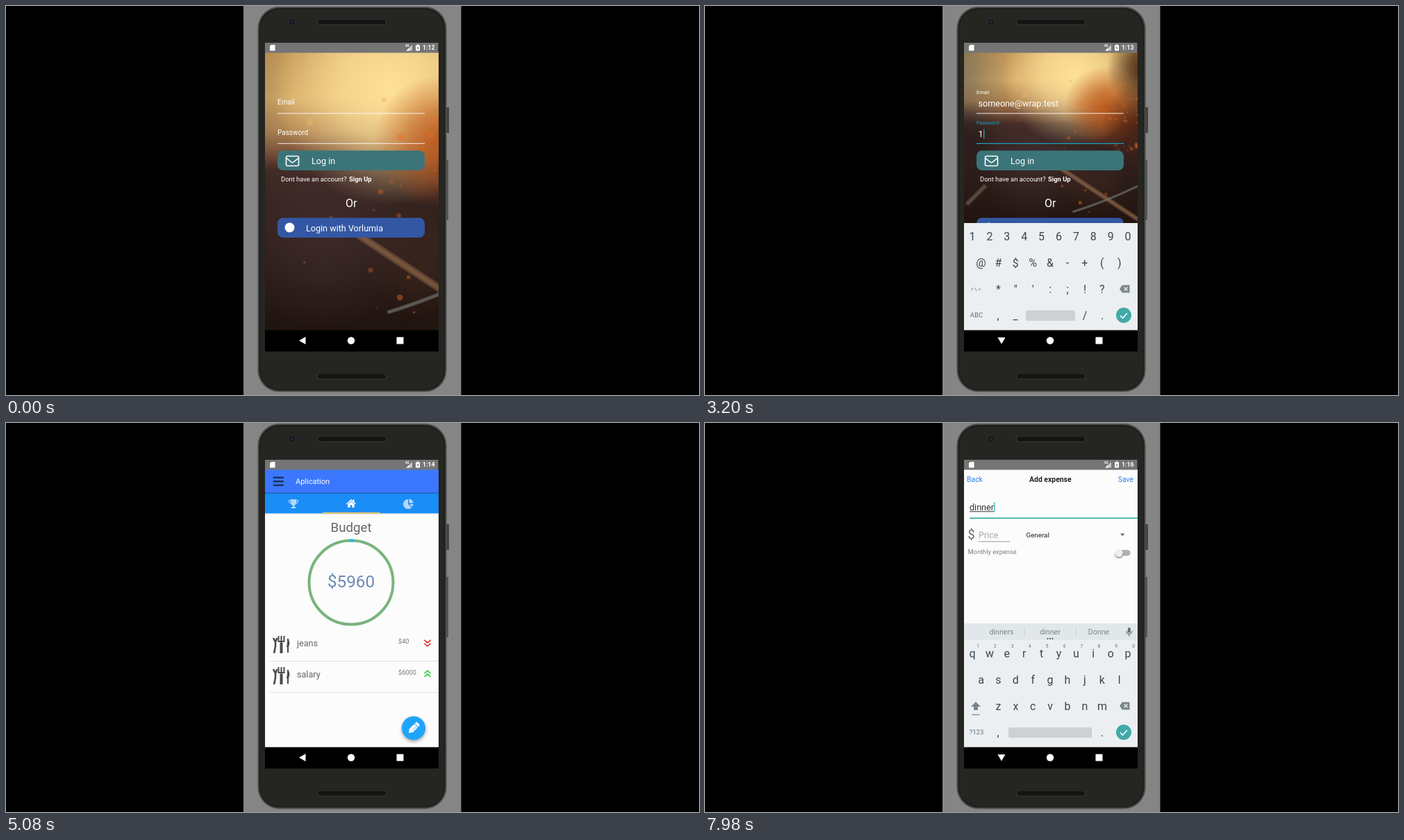
An HTML page with a canvas for the animation above (8000 ms loop, 998x561 px).

```html
<!DOCTYPE html>
<html lang="en">
<head>
<meta charset="utf-8">
<title>Budget app</title>
<style>
  html, body { margin: 0; width: 100%; height: 100%; overflow: hidden; background: #000; }
  canvas { display: block; }
</style>
</head>
<body>
<canvas id="stage" width="998" height="561"></canvas>
<script>
const ctx = document.getElementById('stage').getContext('2d');
const LOOP = 8000;
const EMAIL = 'someone@wrap.test', PASSWORD = '123456', TITLE = 'dinner';
const LETTERS = ['qwertyuiop', 'asdfghjkl', 'zxcvbnm'];
const SYMBOLS = ['1234567890', '@#$%&-+()', '*"\':;!?'];
const ROWS = [[385, 332], [397.5, 370], [422.5, 408]];
const KEY_STEP = 24.9;

// Moments of the story, in ms
const EMAIL_FOCUS = 600, EMAIL_TYPE = 820, PASS_FOCUS = 2620, PASS_SYMBOLS = 2900,
  PASS_TYPE = 3040, SUBMIT = 3850, HOME = 4100, MENU = 5200, FADE = 6560, FORM = 6760,
  FORM_KEYS = 7060, TITLE_TYPE = 7250;

const clamp = x => Math.max(0, Math.min(1, x));
const ease = (t, start, length) => 1 - (1 - clamp((t - start) / length)) ** 3;
const mix = (a, b, k) => a + (b - a) * k;
const count = (s, t, start, step) => Math.max(0, Math.min(s.length, Math.floor((t - start) / step)));
const caretOn = t => t % 1060 < 600;

function text(s, x, y, size, color, align = 'left', weight = 400) {
  ctx.font = `${weight} ${size}px Roboto, sans-serif`;
  ctx.textAlign = align;
  ctx.fillStyle = color;
  ctx.fillText(s, x, y + size * 0.36);
  return ctx.measureText(s).width;
}
function rect(x, y, w, h, color, r = 0) {
  ctx.fillStyle = color;
  ctx.beginPath();
  ctx.roundRect(x, y, w, h, r);
  ctx.fill();
}
function disc(x, y, r, color) {
  ctx.fillStyle = color;
  ctx.beginPath();
  ctx.arc(x, y, r, 0, 7);
  ctx.fill();
}
function shape(path, color) {
  ctx.fillStyle = color;
  ctx.fill(new Path2D(path));
}
function line(path, color, width = 1) {
  ctx.strokeStyle = color;
  ctx.lineWidth = width;
  ctx.stroke(new Path2D(path));
}
function at(x, y, angle, draw) {
  ctx.save();
  ctx.translate(x, y);
  ctx.rotate(angle);
  draw();
  ctx.restore();
}
function shadowed(draw, blur = 5) {
  ctx.save();
  ctx.shadowColor = 'rgba(0,0,0,.4)';
  ctx.shadowBlur = blur;
  ctx.shadowOffsetY = 2;
  draw();
  ctx.restore();
}
function gradient(g, stops) {
  stops.forEach(([p, c]) => g.addColorStop(p, c));
  return g;
}

function phone() {
  rect(0, 0, 998, 561, '#000');
  rect(342, 0, 313.5, 561, '#858585');
  rect(634, 146, 4, 37, '#444');
  rect(634, 222, 3, 87, '#555');
  rect(362.5, 1, 272, 555.5, '#4b4b49', 31);
  rect(364.5, 3, 268, 551.5, '#1b1b1a', 29);
  rect(366, 5, 265, 548, '#252522', 28);
  for (const y of [19, 530]) {
    rect(448, y, 100, 8.5, '#383836', 4);
    rect(449, y + 0.5, 98, 7, '#141414', 3.5);
  }
  disc(412, 23, 3.5, '#15161f');
  disc(412, 23, 1.5, '#29304a');
}

function statusBar(t) {
  rect(373, 53, 249.5, 14.5, t > FADE && t < FORM ? '#595959' : '#757575');
  shape('M382 56H387.5V64.5H380V58Z', '#fff');
  shape('M585 56V64.5H576.5Z', '#c8c8c8');
  shape('M580.5 60.5V64.5H576.5Z', '#fff');
  text('4G', 575, 57.5, 4.5, '#fff', 'left', 700);
  rect(590, 56.5, 6, 8, '#fff', 0.8);
  rect(591.8, 55.5, 2.4, 1.5, '#fff');
  shape('M593.5 57.5L591.5 61H593L592.5 63.5L594.7 60H593.2Z', '#757575');
  const minute = t < 1000 ? 12 : t < 5000 ? 13 : t < FORM ? 14 : t < FORM_KEYS ? 15 : 16;
  text('1:' + minute, 617.5, 60.3, 8.7, '#fff', 'right', 700);
}

function navBar(keysOpen) {
  rect(373, 467.5, 250, 31, '#000');
  shape(keysOpen ? 'M421.5 478H432.5L427 487.5Z' : 'M431.5 477V488L422 482.5Z', '#fff');
  disc(497, 482.5, 5.2, '#fff');
  rect(562.5, 477.5, 10, 10, '#fff', 0.5);
}

// Blurred sunset road; coordinates are fractions of the visible height
function photo(height) {
  ctx.save();
  ctx.beginPath();
  ctx.rect(373, 67, 250, height);
  ctx.clip();
  ctx.translate(497.5, 67);
  ctx.scale(height, height);
  const fill = style => { ctx.fillStyle = style; ctx.fillRect(-0.6, 0, 1.2, 1); };
  const glow = (x, y, r, rgb, alpha) => fill(gradient(ctx.createRadialGradient(x, y, 0, x, y, r),
    [[0, `rgba(${rgb},${alpha})`], [0.45, `rgba(${rgb},${alpha * 0.65})`], [1, `rgba(${rgb},0)`]]));
  fill(gradient(ctx.createLinearGradient(0, 0, 0, 1), [[0, '#c79a58'], [0.16, '#d8ac66'],
    [0.28, '#b08350'], [0.36, '#775039'], [0.42, '#432b25'], [0.55, '#34221f'], [1, '#21140f']]));
  glow(-0.65, 0.12, 0.45, '88,86,80', 0.75);
  glow(0.14, 0.13, 0.42, '255,229,160', 0.95);
  glow(0.1, 0.04, 0.28, '255,220,140', 0.5);
  glow(-0.5, 0.5, 0.22, '38,27,26', 0.8);
  glow(0.32, 0.32, 0.24, '186,78,16', 0.85);
  glow(0.57, 0.1, 0.24, '58,29,12', 1);
  glow(0.55, 0.42, 0.25, '80,34,14', 0.8);
  glow(-0.1, 0.66, 0.33, '82,60,64', 0.38);
  glow(0.25, 0.75, 0.2, '75,48,38', 0.4);
  let seed = 7;
  const random = () => (seed = seed * 16807 % 2147483647) / 2147483647;
  for (let i = 0; i < 70; i++) {
    const low = i > 52;
    disc(low ? mix(-0.3, 0.35, random()) : mix(0.08, 0.56, random()),
      low ? mix(0.35, 0.95, random()) : mix(0.17, 0.6, random()),
      mix(0.003, 0.012, random()), `rgba(240,110,34,${mix(0.12, 0.45, random())})`);
  }
  disc(-0.15, 0.25, 0.013, 'rgba(240,180,100,.4)');
  for (const w of [0.028, 0.014]) {
    line('M0 .64L.56 1.01', 'rgba(150,110,76,.42)', w);
    line('M-.49 .89L-.38 .78', 'rgba(135,120,110,.3)', w);
  }
  for (const w of [0.014, 0.006]) line('M.13 .935Q.34 .87 .57 .755', 'rgba(112,116,110,.5)', w);
  ctx.restore();
}

function symbolKeys(wide) {
  text('ABC', 391, 446, 9.5, '#5f6d74', 'center');
  text('= \\ <', 390, 408, 7.5, '#5f6d74', 'center');
  for (const [s, x] of [[',', 422], ['_', 447], ['/', 547], ['.', 572]]) text(s, x, 446, 16, '#37474f', 'center');
  rect(462, 439, 71, 15, '#cdd1d4', 2);
}
function letterKeys() {
  text('?123', 391, 446, 9.5, '#5f6d74', 'center');
  for (const [s, x] of [[',', 422], ['.', 572]]) text(s, x, 446, 16, '#37474f', 'center');
  rect(437, 439, 120, 15, '#cdd1d4', 2);
  [...'1234567890'].forEach((d, i) => text(d, 393 + KEY_STEP * i, 321.5, 6.5, '#5f6d74', 'center'));
  shape('M390 402L397 409H393V414H387V409H383Z', '#78868c');
  rect(384.5, 420, 11, 1.3, '#78868c');
}
function keyboard(rise, { symbols, words, pressed }) {
  if (rise <= 0) return;
  const top = words ? 289 : 313;
  ctx.save();
  ctx.translate(0, (1 - rise) * (468 - top));
  rect(373, 313, 250, 155, '#eceff1');
  if (words) {
    rect(373, 289, 250, 24, '#e2e7ea');
    const size = words[0].length > 9 ? 10 : 10.6;
    words.forEach((w, i) => text(w, 427 + 70 * i, 301.5, size, '#78868c', 'center'));
    line('M460.5 294V308M534.5 294V308', '#cdd4d8');
    for (const x of [493.5, 497, 500.5]) disc(x, 311, 1.1, '#37474f');
    rect(608.8, 295, 4, 7.5, '#5f6d74', 2);
    line('M606.8 300Q607 304 610.8 304T614.8 300M610.8 304V307.5', '#5f6d74', 1.2);
  }
  const rows = symbols ? SYMBOLS : LETTERS;
  rows.forEach((row, r) => [...row].forEach((key, i) =>
    text(key, ROWS[r][0] + KEY_STEP * i, ROWS[r][1], 16, '#37474f', 'center')));
  symbols ? symbolKeys() : letterKeys();
  shape('M597 408L601 402.5H611.5V413.5H601Z', '#78868c');
  line('M603.5 405.5L608.5 410.5M608.5 405.5L603.5 410.5', '#eceff1', 1.3);
  disc(603, 446, 11, '#42aaa9');
  line('M598 446.5L601.5 450L608 443', '#fff', 1.6);
  rows.forEach((row, r) => {
    const i = pressed ? row.indexOf(pressed) : -1;
    if (i < 0) return;
    const x = ROWS[r][0] + KEY_STEP * i, y = ROWS[r][1];
    shadowed(() => rect(x - 15, y - 57, 30, 69, '#cfd6da', 2), 3);
    text(pressed, x, y - 39, 23, '#37474f', 'center');
    text('...', x + 10, y - 28, 9, '#78868c', 'center');
  });
  ctx.restore();
}

function field(label, y, value, { float, focused, composing, caret }) {
  const accent = '#1b9fc0';
  text(label, 391, mix(y - 16.5, y - 30.5, float), mix(10, 7.4, float), focused ? accent : '#fff');
  rect(391, y - 0.7, 212, 1.3, focused ? accent : 'rgba(255,255,255,.7)');
  const w = value ? text(value, 393.5, y - 14.5, 12.6, '#fff') : 0;
  if (composing && w) rect(393.5, y - 8.5, w, 0.9, '#fff');
  if (caret) rect(394 + w, y - 21, 1.2, 13.5, '#25b5b5');
}

function login(t) {
  const onEmail = t >= EMAIL_FOCUS && t < PASS_FOCUS, onPass = t >= PASS_FOCUS && t < SUBMIT;
  const rise = t < SUBMIT ? ease(t, EMAIL_FOCUS, 120) : 1 - ease(t, SUBMIT, 100);
  const top = t < PASS_FOCUS ? 289 : 313;
  photo(mix(468, top, rise) - 67);

  const n = count(EMAIL, t, EMAIL_TYPE, 100), p = count(PASSWORD, t, PASS_TYPE, 110);
  const lastShown = p && t < SUBMIT ? 1 : 0;
  const secret = '•'.repeat(p - lastShown) + (lastShown ? PASSWORD[p - 1] : '');
  field('Email', 155, EMAIL.slice(0, n), { float: ease(t, EMAIL_FOCUS, 150), focused: onEmail,
    composing: onEmail, caret: onEmail && caretOn(t) });
  field('Password', 198.5, secret, { float: ease(t, PASS_FOCUS, 150), focused: onPass,
    caret: onPass && caretOn(t) });

  rect(391, 208.5, 212, 28.5, '#3b7478', 8);
  line('M405.5 216.5H419.5Q421.5 216.5 421.5 218.5V228.5Q421.5 230.5 419.5 230.5H405.5Q403.5 230.5 403.5 228.5V218.5Q403.5 216.5 405.5 216.5ZM404 219.5L411 225.2Q412.5 226.2 414 225.2L421 219.5', '#fff', 1.6);
  text('Log in', 440, 223, 12.6, '#fff');
  text('Dont have an account?', 396, 249.5, 9.4, '#fff');
  text('Sign Up', 494, 249.5, 9.4, '#fff', 'left', 700);
  text('Or', 497.3, 284, 16, '#fff', 'center');
  rect(391, 305.5, 212, 28.5, '#3457a4', 8);
  disc(408.5, 319.5, 7, '#fff');
  text('Login with Vorlumia', 432, 320.5, 12.6, '#fff');

  const next = EMAIL[n];
  const pressing = t >= EMAIL_TYPE && next && (t - EMAIL_TYPE) % 100 < 45;
  const stem = EMAIL.slice(0, Math.min(n, 7)), tail = EMAIL.slice(8, n);
  keyboard(rise, onEmail ? {
    symbols: n && next === '@',
    words: n < 2 ? ['', '', ''] : tail ? [stem + ' age', stem + 's ' + tail, stem + ' ohm'] : [stem + 's', stem, stem + 'r'],
    pressed: pressing && next,
  } : { symbols: t >= PASS_SYMBOLS });
  return rise > 0.5;
}

function utensils(y) {
  const c = '#4a4a4a';
  line(`M385 ${y - 10}L388 ${y - 4}L390.5 ${y - 10}M388 ${y - 4}V${y + 2}L386 ${y + 12}`, c, 2.6);
  line(`M392.5 ${y - 13}V${y - 5}H400.5V${y - 13}M396.5 ${y - 13}V${y + 12}`, c, 2);
  line(`M396.5 ${y - 3}V${y + 12}`, c, 4);
  line(`M406 ${y - 9}V${y + 11}`, c, 2);
  shape(`M406 ${y - 9}Q410 ${y - 4} 407 ${y + 3}H404Z`, c);
}
function entry(y, name, price, up) {
  utensils(y + 3);
  text(name, 419, y, 12.6, '#666');
  text(price, 565, y - 2, 9.2, '#777');
  const d = up ? -4 : 4;
  line([-d, 0.2 * d].map(o => `M602.5 ${y + o}L607 ${y + o + d}L611.5 ${y + o}`).join(''), up ? '#35d24a' : '#e8382f', 1.7);
  rect(380, y + 26, 243, 0.8, '#d8d8d8');
}
function tabIcons() {
  const dim = '#b5d8fa';
  shape('M410 110H418V114Q418 118 415 119V121H417.5V123H410.5V121H413V119Q410 118 410 114Z', dim);
  line('M410 111.5H407.5Q407.5 116 411 116M418 111.5H420.5Q420.5 116 417 116', dim, 1.2);
  shape('M490 116.5L497 110L499.5 112.3V110.5H501.5V114L504 116.5L503 117.5L497 112.2L491 117.5Z', '#fff');
  shape('M492.3 117.3L497 113.2L501.7 117.3V122H498.5V118.5H495.5V122H492.3Z', '#fff');
  shape('M579 110V117L584 122A7 7 0 1 1 579 110Z', dim);
  shape('M580.5 109.5A6.5 6.5 0 0 1 586.5 115.5H580.5Z', dim);
  shape('M581 117H586.5A6.5 6.5 0 0 1 584.7 121Z', dim);
}
function action(y, color, label, left, open) {
  ctx.save();
  ctx.globalAlpha = open;
  y = mix(440, y, open);
  shadowed(() => disc(587, y, 17, color));
  text('$', 587, y, 21, '#fff', 'center', 700);
  shadowed(() => rect(left, y - 8.5, 561 - left, 17.5, '#fff', 2), 3);
  text(label, (left + 561) / 2, y + 0.5, 8.9, '#555', 'center');
  ctx.restore();
}
function home(t) {
  rect(373, 67, 250, 401, '#fcfcfd');
  rect(373, 101, 250, 29.5, '#1b8df6');
  rect(373, 130.5, 250, 1, '#d5dbe2');
  rect(456, 128.7, 83, 2.3, '#d9c477');
  tabIcons();
  text('Budget', 497, 150, 18.7, '#666', 'center');
  ctx.lineWidth = 4;
  for (const [from, to, color] of [[0, 7, '#79b47d'], [-1.62, -1.5, '#2bb5ee']]) {
    ctx.strokeStyle = color;
    ctx.beginPath();
    ctx.arc(497, 230, 60.5, from, to);
    ctx.stroke();
  }
  text('$5960', 497, 228.5, 24.2, '#6d8bb3', 'center');
  entry(317, 'jeans', '$40', false);
  entry(362, 'salary', '$6000', true);

  const open = ease(t, MENU, 220);
  ctx.save();
  ctx.globalAlpha = open;
  rect(373, 101, 250, 367, 'rgba(36,36,34,.76)');
  ctx.restore();
  rect(373, 67, 250, 34, '#3b78ff');
  rect(373, 100.5, 250, 1.5, 'rgba(0,0,0,.25)');
  for (const y of [78.5, 84, 89.5]) rect(384.5, y - 1, 15.5, 2.5, '#1d3263', 1);
  text('Aplication', 417, 84.5, 11, '#fff');
  if (open) {
    action(338, '#d02528', 'Add expense', 499, open);
    action(389, '#00b163', 'Add income', 503, open);
  }
  shadowed(() => disc(587, 440, 17, '#1fa4fb'));
  at(587, 440, (open - 1) * Math.PI * 0.75, () => {
    shape('M0 -10L3.5 -5V5H-3.5V-5Z', '#fff');
    rect(-3.5, 6, 7, 3.5, '#fff', [0, 0, 1.5, 1.5]);
    line('M-1 -4V4', '#1fa4fb', 0.7);
  });
  if (t > FADE) rect(373, 67, 250, 401, `rgba(255,255,255,${clamp((t - FADE) / 200)})`);
}

function expenseForm(t) {
  rect(373, 67, 250, 401, '#fcfcfd');
  text('Back', 377, 81.5, 10.4, '#2a7fe8');
  text('Add expense', 497.3, 81.5, 10.4, '#222', 'center', 700);
  text('Save', 617, 81.5, 10.4, '#2a7fe8', 'right');
  const n = count(TITLE, t, TITLE_TYPE, 110), typed = TITLE.slice(0, n);
  const w = n ? text(typed, 381, 121.5, 12.6, '#333') : 0;
  rect(381, 127.3, w, 0.9, '#333');
  if (caretOn(t)) rect(381.3 + w, 114, 1.2, 14, '#26a69a');
  rect(381, 136.5, 242, 1.6, '#26a69a');
  text('$', 383.5, 161, 18, '#666', 'center');
  text('Price', 394, 161, 12.6, '#aaa');
  rect(394, 170.5, 45, 0.9, '#999');
  text('General', 462.5, 161, 9.8, '#222');
  shape('M598 159.5H604.5L601.2 163Z', '#666');
  text('Monthly expense', 378.5, 186, 9.3, '#808080');
  rect(593, 183, 19.5, 8.5, '#b0b0b0', 4.2);
  shadowed(() => disc(596, 187.3, 5.8, '#efefef'), 2);

  const rise = ease(t, FORM_KEYS, 120);
  const pressing = t >= TITLE_TYPE && n < TITLE.length && (t - TITLE_TYPE) % 110 < 45;
  keyboard(rise, {
    words: n === 6 ? ['dinners', 'dinner', 'Donne'] : n ? [typed + 's', typed, 'Donne'] : ['', '', ''],
    pressed: pressing && TITLE[n],
  });
  return rise > 0.5;
}

function draw(t) {
  phone();
  ctx.save();
  ctx.beginPath();
  ctx.rect(373, 53, 250, 445.5);
  ctx.clip();
  const scene = t < HOME ? login : t < FORM ? home : expenseForm;
  const keysOpen = scene(t);
  statusBar(t);
  navBar(keysOpen);
  ctx.restore();
}

const start = performance.now();
(function tick() {
  draw((performance.now() - start) % LOOP);
  requestAnimationFrame(tick);
})();
</script>
</body>
</html>
```
